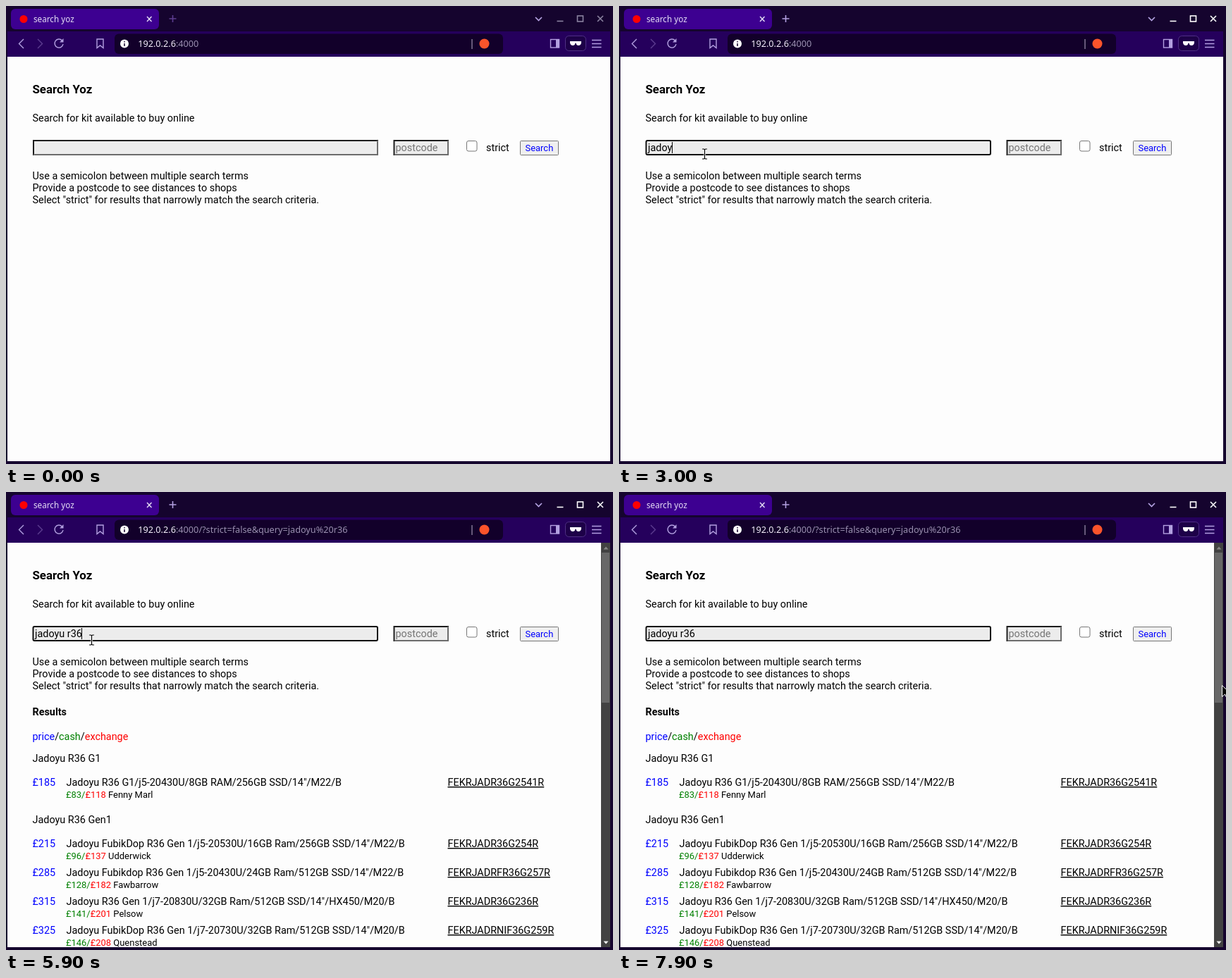
Animation of 861x650 px, one loop 8 s. Source, as an HTML page:

```html
<!DOCTYPE html>
<html lang="en">
<head>
<meta charset="utf-8">
<title>Search</title>
<style>
  html, body { margin: 0; width: 100%; height: 100%; overflow: hidden; background: #15042e; }
  svg { display: block; }
  text { font: 14.4px Roboto, sans-serif; fill: #000; white-space: pre; }
  .ui { font: 12.7px "Noto Sans", sans-serif; fill: #9a90b0; }
  .tab { font-size: 11.7px; fill: #e6def5; }
  .bold { font-weight: 700; }
  .title { font-size: 16.85px; }
  .small { font-size: 12.96px; }
  .price { fill: #00f; }
  .cash { fill: green; }
  .exchange { fill: red; }
  .hint { fill: #757575; }
  .code { text-decoration: underline; }
  .line { fill: none; stroke: #b3a0e0; stroke-width: 1.4; }
  #controls, #plus { fill: none; stroke-width: 1.6; }
</style>
</head>
<body>
<svg width="861" height="650" viewBox="0 0 861 650">
  <defs>
    <clipPath id="view"><rect x="2" y="72" width="855" height="574"/></clipPath>
  </defs>

  <!-- window frame -->
  <rect width="861" height="650" fill="#15042e"/>
  <rect x="2" y="36" width="855" height="36" fill="#25005c"/>
  <rect x="7" y="4" width="210" height="29" rx="6" fill="#3d0091"/>
  <circle cx="25" cy="18.5" r="5.5" fill="#f00"/>
  <text class="ui tab" x="39" y="22.5">search yoz</text>
  <path class="line" d="M200 15l6.5 7M206.500 15l-6.500 7" style="stroke:#e6def5"/>
  <path id="plus" d="M231.500 18h10M236.500 13v10"/>
  <path class="line" d="M751 16l4.500 4.500 4.500-4.500" style="stroke-width:1.7"/>
  <g id="controls">
    <path d="M781.500 21.500h9"/>
    <rect x="810.500" y="14" width="8" height="8"/>
    <path d="M839 14l8 8M847 14l-8 8"/>
  </g>

  <!-- toolbar -->
  <path class="line" d="M25 47l-6.500 6.500 6.500 6.500"/>
  <path class="line" d="M45 47l6.500 6.500-6.500 6.500" style="stroke:#5d3d90"/>
  <path class="line" d="M79.500 49a6 6 0 1 0 1.500 5"/>
  <path d="M81.500 46v5.500h-5.500z" fill="#b3a0e0"/>
  <path class="line" d="M129 47h9v12.500l-4.500-3.500-4.500 3.500z"/>
  <rect x="154" y="39.500" width="551" height="28.500" rx="6" fill="#12002a"/>
  <circle cx="168" cy="53.500" r="6" fill="#fff"/>
  <path d="M168 50v1.500M168 53v4" stroke="#12002a" stroke-width="1.5"/>
  <text class="ui" x="187.200" y="58"><tspan fill="#f2edf9">192.0.2.6</tspan>:4000<tspan id="query"></tspan></text>
  <path d="M661 47v14" stroke="#b9b0c8"/>
  <circle cx="678.500" cy="53.500" r="7" fill="#fb542b"/>
  <rect class="line" x="772.500" y="47.500" width="12" height="11.500"/>
  <path d="M780 47h5v12h-5z" fill="#b3a0e0"/>
  <rect x="793.500" y="42.500" width="29" height="21" rx="5" fill="#1d0048" stroke="#4f3085"/>
  <path d="M800 50h16v2q-.5 4-4 4-3 0-3.500-3.500h-1q-.5 3.500-3.500 3.500-3.500 0-4-4z" fill="#fff"/>
  <path class="line" d="M831 48.500h13.500M831 53.500h13.500M831 58.500h13.500"/>

  <!-- page -->
  <g clip-path="url(#view)">
    <rect x="2" y="72" width="855" height="574" fill="#fdfdfd"/>
    <text class="bold title" x="37.500" y="124">Search Yoz</text>
    <text x="37.500" y="164">Search for kit available to buy online</text>

    <rect x="38" y="190" width="490" height="22" fill="#ececec"/>
    <g id="idle">
      <path d="M39 212v-21h489" fill="none" stroke="#1c1c1c" stroke-width="2"/>
      <path d="M527 191v20h-488" fill="none" stroke="#6c6c6c" stroke-width="2"/>
    </g>
    <rect id="focus" x="38.500" y="191" width="488.500" height="20" rx="2" fill="none" stroke="#101010" stroke-width="2"/>
    <text id="typed" x="41" y="206"></text>
    <rect id="caret" x="41" y="193" width="1" height="16"/>

    <rect x="550" y="190" width="78" height="22" fill="#ececec"/>
    <path d="M550.500 212v-21h77.500" fill="none" stroke="#1c1c1c" stroke-width="2"/>
    <path d="M627 191v20h-76" fill="none" stroke="#6c6c6c" stroke-width="2"/>
    <text class="hint" x="552.500" y="206">postcode</text>
    <rect x="653.500" y="191.500" width="14.500" height="14.500" rx="2.500" fill="#fff" stroke="#767676"/>
    <text x="681" y="206">strict</text>
    <rect x="729.500" y="191.500" width="54" height="20" rx="1" fill="#efefef" stroke="#767676"/>
    <text class="small price" x="736.500" y="206">Search</text>

    <text x="37.500" y="246">Use a semicolon between multiple search terms</text>
    <text x="37.500" y="263">Provide a postcode to see distances to shops</text>
    <text x="37.500" y="280">Select "strict" for results that narrowly match the search criteria.</text>

    <g id="results">
      <text class="bold" x="37.500" y="317">Results</text>
      <text x="37.500" y="352"><tspan class="price">price</tspan>/<tspan class="cash">cash</tspan>/<tspan class="exchange">exchange</tspan></text>
      <text x="37.500" y="383">Jadoyu R36 G1</text>
      <text x="37.500" y="470">Jadoyu R36 Gen1</text>
      <g id="rows"></g>
      <rect x="844" y="72" width="13" height="574" fill="#424242"/>
      <rect x="845" y="86" width="11" height="213" fill="#686868"/>
      <path d="M847.500 81.500h7l-3.500-4z" fill="#858585"/>
      <path d="M847.500 637.500h7l-3.500 4z" fill="#f0f0f0"/>
    </g>
  </g>

  <g id="cursor">
    <path id="arrow" d="M0 0v16l4-3.500 2.500 5.500 2.600-1.200-2.500-5.300h5.200z" fill="#000" stroke="#fff"/>
    <g id="beam" fill="none">
      <path d="M-3.500-6.500h2.500l1 1 1-1h2.500M0-5.500v12M-3.500 7.500h2.500l1-1 1 1h2.500" stroke="#fff" stroke-width="2.500"/>
      <path d="M-3.500-6.500h2.500l1 1 1-1h2.500M0-5.500v12M-3.500 7.500h2.500l1-1 1 1h2.500" stroke="#000" stroke-width="1.200"/>
    </g>
  </g>
</svg>
<script>
  const LOOP = 8000, STEP = 100;
  const FOCUS = 1500, LOADED = 5900;
  const TERM = 'jadoyu r36';
  const KEY_TIMES = [2000, 2100, 2300, 2600, 3000, 3100, 3400, 3600, 4000, 4500];
  const BLINK = 600;

  // Pointer path: time, x, y
  const PATH = [
    [300, 300, 2], [500, 245, 95], [700, 180, 195], [800, 152, 230],
    [1000, 125, 222], [1100, 121, 213], [1200, 121, 211], [1500, 121, 209],
    [6800, 121, 209], [6900, 126, 213], [7000, 150, 230], [7200, 275, 279],
    [7400, 430, 298], [7500, 498, 297], [7600, 562, 288], [7700, 619, 274],
    [7800, 742, 271], [7900, 855, 274]
  ];

  // Baseline, price, description, code, cash, exchange, shop
  const ROWS = [
    [417, 185, 'Jadoyu R36 G1/j5-20430U/8GB RAM/256GB SSD/14"/M22/B', 'FEKRJADR36G2541R', 83, 118, 'Fenny Marl'],
    [504, 215, 'Jadoyu FubikDop R36 Gen 1/j5-20530U/16GB Ram/256GB SSD/14"/M22/B', 'FEKRJADR36G254R', 96, 137, 'Udderwick'],
    [545, 285, 'Jadoyu Fubikdop R36 Gen 1/j5-20430U/24GB Ram/512GB SSD/14"/M22/B', 'FEKRJADRFR36G257R', 128, 182, 'Fawbarrow'],
    [586, 315, 'Jadoyu R36 Gen 1/j7-20830U/32GB Ram/512GB SSD/14"/HX450/M20/B', 'FEKRJADR36G236R', 141, 201, 'Pelsow'],
    [627, 325, 'Jadoyu FubikDop R36 Gen 1/j7-20730U/32GB Ram/512GB SSD/14"/M20/B', 'FEKRJADRNIF36G259R', 146, 208, 'Quenstead']
  ];

  const el = id => document.getElementById(id);
  const show = (id, on) => el(id).setAttribute('visibility', on ? 'visible' : 'hidden');
  const label = (x, y, cls, content) => `<text class="${cls}" x="${x}" y="${y}">${content}</text>`;

  el('rows').innerHTML = ROWS.map(([y, price, name, code, cash, exchange, shop]) =>
    label(37.5, y, 'price', '£' + price) +
    label(85.5, y, '', name) +
    label(626.5, y, 'code', code) +
    label(85, y + 17, 'small',
      `<tspan class="cash">£${cash}/</tspan><tspan class="exchange">£${exchange}</tspan> ${shop}`)
  ).join('');

  function pointerAt(t) {
    const i = PATH.findIndex(p => p[0] > t);
    if (i < 0) return PATH[PATH.length - 1].slice(1);
    const [t0, x0, y0] = PATH[i - 1], [t1, x1, y1] = PATH[i];
    const k = (t - t0) / (t1 - t0);
    return [x0 + (x1 - x0) * k, y0 + (y1 - y0) * k];
  }

  function drawPointer(t) {
    const visible = t >= PATH[0][0];
    show('arrow', false);
    show('beam', false);
    if (!visible) return;
    const [x, y] = pointerAt(t).map(Math.round);
    const overField = x > 38 && x < 528 && y > 190 && y < 214;
    show(overField ? 'beam' : 'arrow', true);
    el('cursor').setAttribute('transform', `translate(${x + .5} ${y + .5})`);
  }

  function drawField(t) {
    const count = KEY_TIMES.filter(k => k <= t).length;
    const typed = el('typed');
    typed.textContent = TERM.slice(0, count);
    const width = count ? typed.getSubStringLength(0, count) : 0;
    const lastKey = KEY_TIMES[KEY_TIMES.length - 1];
    const lit = t < lastKey || Math.floor((t - lastKey) / BLINK) % 2 === 0;
    el('caret').setAttribute('x', Math.floor(41 + width));
    show('caret', t >= FOCUS && lit);
    show('focus', t >= FOCUS);
    show('idle', t < FOCUS);
  }

  function draw(now) {
    const t = Math.floor(now % LOOP / STEP) * STEP;
    const active = t >= PATH[0][0];
    el('controls').setAttribute('stroke', active ? '#fff' : '#8b83a0');
    el('plus').setAttribute('stroke', active ? '#b3a0e0' : '#5d3d90');
    el('query').textContent = t >= LOADED ? '/?strict=false&query=' + TERM.replace(' ', '%20') : '';
    show('results', t >= LOADED);
    drawField(t);
    drawPointer(t);
  }

  let start;
  function tick(now) {
    start ??= now;
    draw(now - start);
    requestAnimationFrame(tick);
  }
  draw(0);
  requestAnimationFrame(tick);
</script>
</body>
</html>
```
